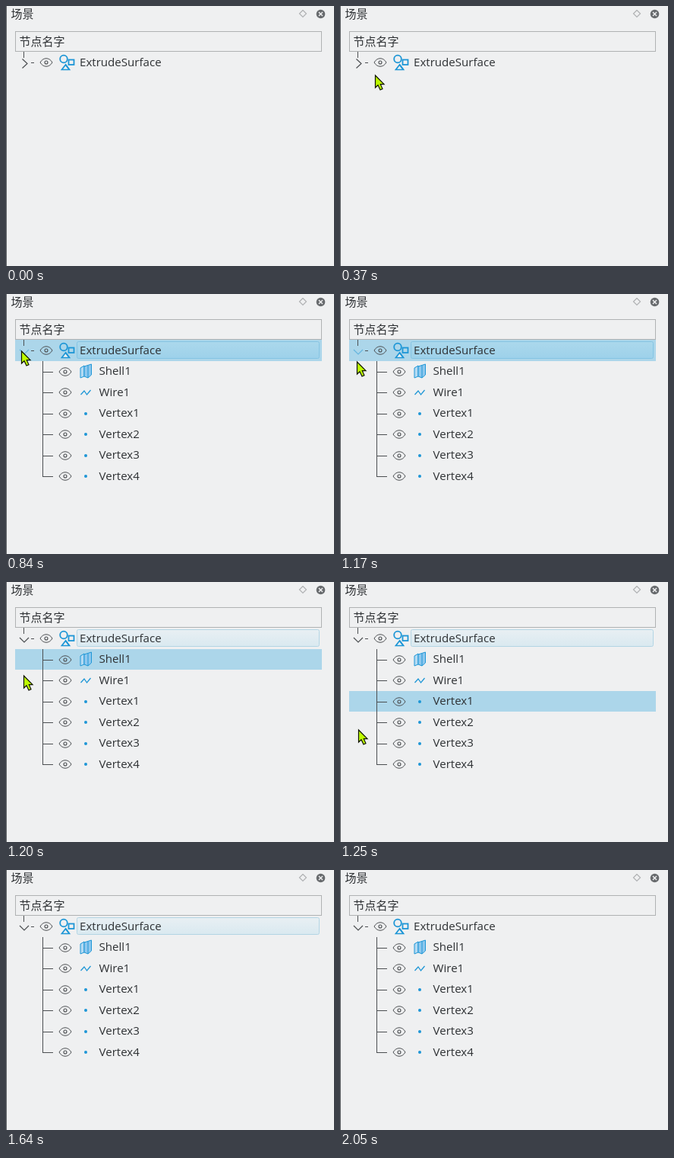
These frames come from a looping animation (432 px wide and 341 px high, 2100 ms). An HTML page with a canvas:

```html
<!DOCTYPE html>
<html lang="zh-CN">
<head>
<meta charset="utf-8">
<title>场景</title>
<style>
html, body { margin: 0; overflow: hidden; background: #eff0f1; }
canvas { display: block; }
</style>
</head>
<body>
<canvas width="432" height="341"></canvas>
<script>
const c = document.querySelector('canvas').getContext('2d');
const LOOP = 2100, ENTER = 140, REST = 650, FOCUS = 780, OPEN = 840;
const LEAVE = 1140, GONE = 1640, BLUR = 2050, LAG = 30;
const INK = '#4c4f52', BLUE = '#1d96d6', BG = '#eff0f1', HOVER = '#acd6ea';
const LATIN = '15.1px "Open Sans", "Noto Sans", sans-serif';
const HAN = '15px "Noto Sans CJK SC", "Noto Sans CJK JP", sans-serif';
const names = ['ExtrudeSurface', 'Shell1', 'Wire1', 'Vertex1', 'Vertex2', 'Vertex3', 'Vertex4'];
const PITCH = 27.5, TOP = 60;

// The picture refreshes in a rhythm of 50, 50, 50 and 30 ms.
function snap(t) {
  const base = t < FOCUS ? ENTER : LEAVE - 120;
  const phase = (t - base) % 180;
  return t - phase + Math.floor(phase / 50) * 50;
}

// The pointer glides up to the arrow, rests, then sweeps down and out.
function pointAt(t) {
  const left = 1 - Math.min(1, Math.max(0, (t - ENTER) / (REST - ENTER)));
  const sweep = 1 - Math.exp(-((Math.max(0, t - LEAVE) / 147) ** 1.82));
  return [
    Math.round(20 + 85 * left ** 2 + 6.5 * Math.sqrt(sweep)),
    Math.round(75 + 201 * left ** 4.2 + 268 * sweep)
  ];
}

function line(points, color, width = 1, fill) {
  c.beginPath();
  for (let i = 0; i < points.length; i += 2) c.lineTo(points[i], points[i + 1]);
  if (fill) {
    c.closePath();
    c.fillStyle = fill;
    c.fill();
  }
  c.strokeStyle = color;
  c.lineWidth = width;
  c.stroke();
}

function circle(x, y, r, color, width) {
  c.beginPath();
  c.arc(x, y, r, 0, 7);
  c.fillStyle = c.strokeStyle = color;
  c.lineWidth = width || 1;
  width ? c.stroke() : c.fill();
}

function rect(x, y, w, h, color) {
  c.fillStyle = color;
  c.fillRect(x, y, w, h);
}

function text(s, x, y, font) {
  c.font = font;
  c.fillStyle = '#2e3134';
  c.fillText(s, x, y);
}

function eye(x, y) {
  c.beginPath();
  for (const side of [-1, 1]) {
    c.moveTo(x - 8, y);
    c.bezierCurveTo(x - 4, y + 7 * side, x + 4, y + 7 * side, x + 8, y);
  }
  c.strokeStyle = INK;
  c.lineWidth = 1;
  c.stroke();
  circle(x, y, 2, INK, 1.1);
}

function frameBox(lit) {
  const g = c.createLinearGradient(0, 63, 0, 85);
  g.addColorStop(0, lit ? '#abd8ec' : '#e8eff3');
  g.addColorStop(1, lit ? '#9dd1ea' : '#d9e9f0');
  c.beginPath();
  c.roundRect(93.5, 62.5, 319, 22, 2);
  c.fillStyle = g;
  c.fill();
  c.strokeStyle = lit ? '#84c4e3' : '#b3d5e4';
  c.lineWidth = 1;
  c.stroke();
}

function panel() {
  rect(0, 0, 432, 341, BG);
  rect(0, 0, 1, 341, '#5d6064');
  text('场景', 6.5, 16, HAN);
  line([391, 5.5, 395.5, 10, 391, 14.5, 386.5, 10, 391, 5.5], '#b0b2b4', 1.2);
  circle(414.5, 10.5, 5.8, '#686b6e');
  line([412, 8, 417, 13], BG, 1.5);
  line([417, 8, 412, 13], BG, 1.5);
  c.strokeStyle = '#b0b2b3';
  c.lineWidth = 1;
  c.strokeRect(12.5, 33.5, 403, 26);
  text('节点名字', 17.5, 52, HAN);
}

function rootRow(open, hot) {
  line([23.5, 60, 23.5, 68], INK);
  line([33, 74.5, 37, 74.5], INK);
  const arrow = open ? [18, 73, 24, 79, 30, 73] : [21.5, 69.5, 28, 75.5, 21.5, 81.5];
  line(arrow, hot ? '#65b5de' : INK, 1.2);
  eye(53, 74);
  circle(76, 69.5, 4.8, BLUE, 1.8);
  c.strokeRect(82.5, 70.5, 7, 6.5);
  line([78.5, 77, 73.5, 83.5, 83.5, 83.5], BLUE, 1.7, BG);
  line([83.5, 83.5, 78.5, 77], BLUE, 1.7);
  text(names[0], 97, 79, LATIN);
}

function childRow(i) {
  const y = Math.round(74 + PITCH * i), name = names[i];
  line([48, y + .5, 62, y + .5], INK);
  eye(78, y);
  if (name.startsWith('Shell')) {
    line([98, y - 5, 103, y - 8, 103, y + 6, 98, y + 8], BLUE, 1, '#b4daf2');
    line([103, y - 7, 112.5, y - 10, 112.5, y + 4, 108, y + 8, 103, y + 6], BLUE, 1, '#8fc8ee');
    line([108, y - 8, 108, y + 8], BLUE);
  } else if (name.startsWith('Wire')) {
    line([98.5, y + 3, 103, y - 2, 106.5, y + 3, 111.5, y - 3], BLUE, 1.3);
  } else {
    circle(105, y, 2, BLUE);
  }
  text(name, 122.5, Math.floor(79 + PITCH * i), LATIN);
}

function pointer(x, y) {
  c.save();
  c.translate(x + .5, y);
  line([0, 0, 0, 16, 3.5, 12.7, 6.5, 19, 9.5, 17.6, 6.8, 11.7, 11.5, 11.7], '#101400', 1.2, '#bdfb00');
  c.restore();
}

// The row highlight trails the pointer a little.
function hoverAt(t, rows) {
  const [x, y] = pointAt(t - LAG);
  const row = Math.floor((y - TOP) / PITCH);
  return { row: row < rows ? row : -1, hot: row === 0 && x < 34 };
}

function draw(t) {
  const open = t >= OPEN;
  const shown = t >= ENTER && t < GONE;
  const now = snap(t);
  const { row, hot } = shown ? hoverAt(now, open ? names.length : 1) : { row: -1, hot: false };
  panel();
  if (row >= 0) {
    const y = Math.round(TOP + PITCH * row);
    rect(12, y, 404, Math.round(TOP + PITCH * (row + 1)) - y, HOVER);
  }
  if (t >= FOCUS && t < BLUR) frameBox(row === 0);
  rootRow(open, hot);
  if (open) {
    line([48.5, 88, 48.5, 240], INK);
    for (let i = 1; i < names.length; i++) childRow(i);
  }
  if (shown) pointer(...pointAt(now));
}

const start = performance.now();
function tick() {
  draw((performance.now() - start) % LOOP);
  requestAnimationFrame(tick);
}
tick();
</script>
</body>
</html>
```
